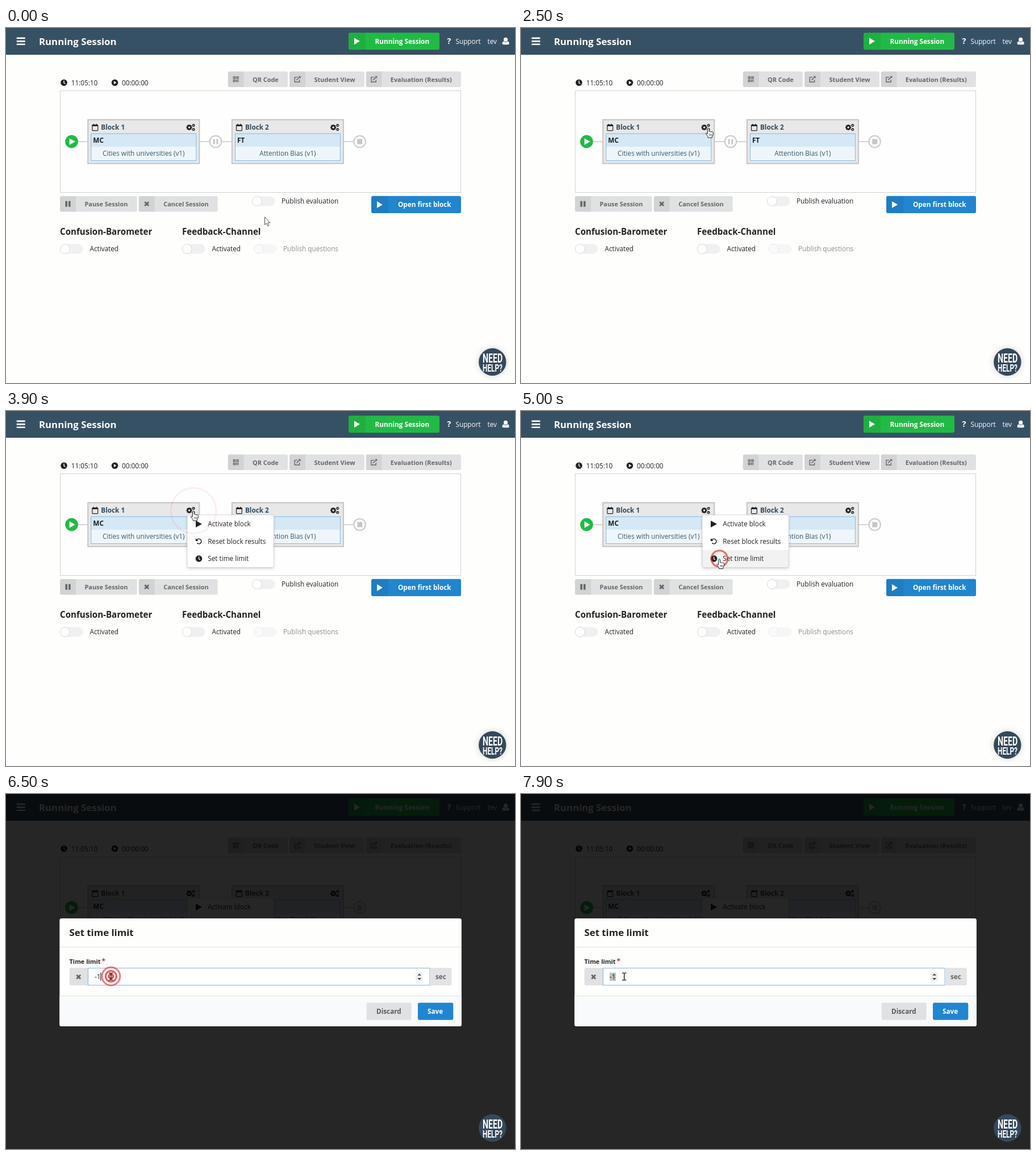
Recreate the animation shown at these times as an HTML page with a canvas. Size 896 by 625 pixels, loop 8000 ms.

```html
<!DOCTYPE html>
<html lang="en">
<head>
<meta charset="utf-8">
<title>Running Session</title>
<style>
html, body { margin: 0; width: 100%; height: 100%; overflow: hidden; background: #fefefd; }
canvas { display: block; width: 896px; height: 625px; }
</style>
</head>
<body>
<canvas id="stage" width="896" height="625"></canvas>
<script>
const ctx = document.getElementById('stage').getContext('2d');
const LOOP = 8000, STEP = 100;
const SANS = '"Open Sans", "Noto Sans", sans-serif';
const INK = '#222', MUTED = '#666', NAVY = '#375164', BLUE = '#2185d0', GREEN = '#21ba45', GREY = '#e0e1e2';
const BODY = 11.76, SMALL = 10.92, TITLE = 16.8, HEADING = 15.12;

// Drawing helpers
function text(s, x, y, color = INK, size = BODY, weight = 400, align = 'left') {
  ctx.font = `${weight} ${size}px ${SANS}`;
  ctx.textAlign = align;
  ctx.fillStyle = color;
  ctx.fillText(s, x, y);
}
const bold = (s, x, y, color, size) => text(s, x, y, color, size, 700);

function rect(x, y, w, h, color) {
  ctx.fillStyle = color;
  ctx.fillRect(x, y, w, h);
}
function frame(x, y, w, h, color, lw = 1) {
  ctx.strokeStyle = color;
  ctx.lineWidth = lw;
  ctx.strokeRect(x + lw / 2, y + lw / 2, w - lw, h - lw);
}
function round(x, y, w, h, r, color) {
  ctx.beginPath();
  ctx.roundRect(x, y, w, h, r);
  ctx.fillStyle = color;
  ctx.fill();
}
function disc(x, y, r, color) {
  ctx.beginPath();
  ctx.arc(x, y, r, 0, Math.PI * 2);
  ctx.fillStyle = color;
  ctx.fill();
}
function circle(x, y, r, color, lw) {
  ctx.beginPath();
  ctx.arc(x, y, r, 0, Math.PI * 2);
  ctx.strokeStyle = color;
  ctx.lineWidth = lw;
  ctx.stroke();
}
function poly(points, color) {
  ctx.beginPath();
  points.forEach(([x, y]) => ctx.lineTo(x, y));
  ctx.closePath();
  ctx.fillStyle = color;
  ctx.fill();
}
function line(points, color, lw) {
  ctx.beginPath();
  points.forEach(([x, y]) => ctx.lineTo(x, y));
  ctx.strokeStyle = color;
  ctx.lineWidth = lw;
  ctx.stroke();
}

// Icons, placed by their centre
function play(x, y, color, w = 10, h = 12) {
  poly([[x - w / 2, y - h / 2], [x + w / 2, y], [x - w / 2, y + h / 2]], color);
}
function pause(x, y, color, w = 3.6, h = 10, gap = 2) {
  rect(x - gap / 2 - w, y - h / 2, w, h, color);
  rect(x + gap / 2, y - h / 2, w, h, color);
}
function cross(x, y, color) {
  line([[x - 3.4, y - 3.4], [x + 3.4, y + 3.4]], color, 2.8);
  line([[x + 3.4, y - 3.4], [x - 3.4, y + 3.4]], color, 2.8);
}
function clock(x, y) {
  disc(x, y, 5.8, INK);
  line([[x, y - 3.6], [x, y + 0.4], [x + 2.4, y + 2]], '#fff', 1.3);
}
function gear(x, y, r, teeth) {
  for (let i = 0; i < teeth; i++) {
    const a = i / teeth * Math.PI * 2;
    line([[x, y], [x + Math.cos(a) * r, y + Math.sin(a) * r]], INK, r * 0.5);
  }
  circle(x, y, r * 0.58, INK, r * 0.42);
  disc(x, y, r * 0.36, '#e8e8e8');
}
function gears(x, y) {
  gear(x - 2.8, y, 5, 8);
  gear(x + 4.8, y - 3.6, 2.7, 6);
  gear(x + 4.8, y + 3.6, 2.7, 6);
}
function calendar(x, y) {
  ctx.beginPath();
  ctx.roundRect(x - 4.9, y - 4.3, 9.8, 10, 1);
  ctx.strokeStyle = INK;
  ctx.lineWidth = 1.2;
  ctx.stroke();
  rect(x - 5, y - 4.5, 10, 2.4, INK);
  rect(x - 3.3, y - 6.2, 1.6, 2.4, INK);
  rect(x + 1.7, y - 6.2, 1.6, 2.4, INK);
}
function qrIcon(x, y) {
  for (const [dx, dy] of [[-5, -5], [0.6, -5], [-5, 0.6]]) frame(x + dx, y + dy, 4.4, 4.4, MUTED, 1.4);
  rect(x + 0.6, y + 0.6, 2, 4.4, MUTED);
  rect(x + 3.4, y + 0.6, 1.6, 2, MUTED);
  rect(x + 3.4, y + 3.6, 1.6, 1.4, MUTED);
}
function external(x, y) {
  line([[x + 0.5, y - 3.6], [x - 4.8, y - 3.6], [x - 4.8, y + 4.8], [x + 3.6, y + 4.8], [x + 3.6, y + 0.8]], MUTED, 1.4);
  line([[x - 1.6, y + 1.6], [x + 4, y - 4]], MUTED, 1.6);
  poly([[x + 1.6, y - 5.4], [x + 5.6, y - 5.4], [x + 5.6, y - 1.4]], MUTED);
}
function undo(x, y) {
  ctx.beginPath();
  ctx.arc(x, y, 4.3, -2.6, 2.4);
  ctx.strokeStyle = INK;
  ctx.lineWidth = 1.6;
  ctx.stroke();
  poly([[x - 5.6, y - 5.4], [x - 5.6, y - 0.6], [x - 0.8, y - 0.6]], INK);
}

// Page parts
function button(x, y, w, h, fill, iconW) {
  round(x, y, w, h, 3, fill);
  if (iconW) round(x, y, iconW, h, [3, 0, 0, 3], 'rgba(0,0,0,0.06)');
}
function smallButton(x, y, w, icon, label, labelX) {
  button(x, y, w, 27.5, GREY, 28);
  icon(x + 14, y + 13.7, MUTED);
  bold(label, labelX, y + 18, MUTED, SMALL);
}
function toggle(x, y, label, labelX, alpha = 1) {
  ctx.globalAlpha = alpha;
  round(x, y - 8.5, 40.5, 17, 8.5, '#f0f0f0');
  disc(x + 8.8, y, 8.6, '#fefefe');
  circle(x + 8.8, y, 8.4, '#d6d6d6', 0.9);
  text(label, labelX, y + 4.2);
  ctx.globalAlpha = 1;
}
function block(x, name, kind, question) {
  rect(x, 160.5, 198, 79, '#e8e8e8');
  frame(x, 160.5, 198, 79, '#c6c6c6', 2);
  calendar(x + 13.5, 175);
  bold(name, x + 24, 179, '#2f4a5e');
  gears(x + 182, 175);
  rect(x + 6, 185.5, 186, 48.5, '#eef6fc');
  rect(x + 6, 185.5, 186, 23.5, '#d5e8f6');
  frame(x + 6, 185.5, 186, 48.5, '#85b9e0');
  bold(kind, x + 10, 202, '#1c1c1c');
  text(question, x + 99, 225.3, '#3d586c', BODY, 400, 'center');
}
function header() {
  rect(0, 0, 896, 47, NAVY);
  rect(0, 46, 896, 1, '#2c4456');
  for (const y of [16.6, 22, 27.4]) round(18.7, y, 15, 2.7, 0.6, '#fff');
  bold('Running Session', 58, 30, '#fff', TITLE);
  button(603, 8.3, 160, 30, GREEN, 30);
  play(618, 23.3, '#fff');
  bold('Running Session', 649.5, 28, '#fff');
  bold('?', 776.5, 28.3, '#fff', 14.5);
  text('Support', 791.5, 28, '#fff');
  text('tev', 847.5, 28, '#fff');
  round(873.5, 23.3, 12.2, 6, [4, 4, 2, 2], '#fff');
  disc(879.6, 20.6, 4.3, NAVY);
  disc(879.6, 20.4, 3.6, '#fff');
}
function timeline() {
  rect(95, 110, 706, 180, '#fefefe');
  frame(95, 110, 706, 180, '#d2d2d2');
  for (const x of [127, 341, 380, 595]) rect(x, 199.2, 17, 1.7, '#cfcfcf');
  disc(115.5, 200, 11.4, GREEN);
  play(116.7, 200, '#fff', 10, 11.5);
  circle(369, 200, 10.2, '#cacaca', 2);
  pause(369, 200, '#c6c6c6', 3, 9, 2.6);
  circle(622.7, 200, 10.2, '#cacaca', 2);
  rect(618.2, 195.5, 9, 9, '#c6c6c6');
  block(143.3, 'Block 1', 'MC', 'Cities with universities (v1)');
  block(396.9, 'Block 2', 'FT', 'Attention Bias (v1)');
}
function page() {
  rect(0, 0, 896, 625, '#fefefd');
  header();
  clock(102, 96.2);
  text('11:05:10', 114.7, 100.6);
  disc(191.5, 96.2, 5.8, INK);
  play(192.2, 96.2, '#fff', 4.6, 5.8);
  text('00:00:00', 204, 100.6);
  smallButton(390.7, 76.5, 105.3, qrIcon, 'QR Code', 434);
  smallButton(499, 76.5, 132, external, 'Student View', 542.6);
  smallButton(633.7, 76.5, 167.3, external, 'Evaluation (Results)', 676.8);
  timeline();
  smallButton(95, 296, 135.7, pause, 'Pause Session', 138.5);
  smallButton(233.7, 296, 139, cross, 'Cancel Session', 277.2);
  toggle(433, 305, 'Publish evaluation', 485);
  button(643, 295.7, 158, 30.2, BLUE, 30);
  play(658, 311, '#fff');
  bold('Open first block', 690, 315.4, '#fff');
  bold('Confusion-Barometer', 95, 364.2, INK, HEADING);
  bold('Feedback-Channel', 310, 364.2, INK, HEADING);
  toggle(95, 389, 'Activated', 147.5);
  toggle(310, 389, 'Activated', 362.5);
  toggle(436, 389, 'Publish questions', 488, 0.5);
}
function menu(hover) {
  ctx.shadowColor = 'rgba(34,36,38,0.2)';
  ctx.shadowBlur = 5;
  ctx.shadowOffsetY = 2;
  round(319, 183, 152.5, 92.5, 3, '#fff');
  ctx.shadowColor = 'transparent';
  ctx.shadowBlur = ctx.shadowOffsetY = 0;
  if (hover >= 0) rect(319, 184 + hover * 30.4, 152.5, 30.4, '#f2f2f2');
  ctx.beginPath();
  ctx.roundRect(319, 183, 152, 92.5, 3);
  ctx.strokeStyle = 'rgba(34,36,38,0.15)';
  ctx.lineWidth = 0.9;
  ctx.stroke();
  play(339.5, 199, INK, 11, 12);
  undo(339.5, 229.5);
  clock(339.5, 260);
  ['Activate block', 'Reset block results', 'Set time limit'].forEach((s, i) => text(s, 355.3, 203.3 + i * 30.4));
}
function modal(caret, selected) {
  round(94.3, 219, 707.6, 190, 3.5, '#fefefd');
  round(94.3, 355, 707.6, 54, [0, 0, 3.5, 3.5], '#f8fafb');
  rect(94.3, 269, 707.6, 1, '#dde2de');
  rect(94.3, 355, 707.6, 1, '#dde2de');
  bold('Set time limit', 111.5, 250.3, INK, TITLE);
  bold('Time limit', 111.5, 299.2, INK, SMALL);
  bold('*', 168.4, 298.8, '#db2828', BODY);
  round(111.7, 306, 33, 31, [3, 0, 0, 3], GREY);
  cross(127.7, 322, MUTED);
  rect(144, 306, 602.5, 31, '#fff');
  frame(144, 306, 602.5, 31, '#85b7d9');
  if (selected) rect(156, 314.5, 11, 14.5, '#c0c0c0');
  text('-1', 156, 326.2);
  if (caret) rect(166.3, 314.5, 1, 14.5, '#111');
  rect(721, 314, 13, 15.5, '#f0f0f0');
  poly([[724.3, 319.6], [727.7, 316.2], [731.1, 319.6]], '#444');
  poly([[724.3, 324], [727.7, 327.4], [731.1, 324]], '#444');
  round(746.5, 306, 38, 31, [0, 3, 3, 0], '#e2e3e4');
  bold('sec', 756, 326, MUTED);
  button(634.7, 367.5, 79, 30.3, GREY);
  bold('Discard', 652, 387.2, '#5a5a5a');
  button(725, 367.5, 62.3, 30.3, BLUE);
  bold('Save', 742, 387.2, '#fff');
}
// Tall, narrow lettering on the help badge
function badge(dimmed) {
  if (!dimmed) {
    ctx.shadowColor = 'rgba(0,0,0,0.18)';
    ctx.shadowBlur = 12;
  }
  disc(856.3, 588, 24.2, '#34495c');
  ctx.shadowColor = 'transparent';
  ctx.shadowBlur = 0;
  ctx.fillStyle = '#fff';
  ctx.textAlign = 'center';
  for (const [word, size, y] of [['NEED', 14.2, 589], ['HELP?', 11.8, 604.8]]) {
    ctx.save();
    ctx.translate(856.5, y);
    ctx.scale(1, 1.6);
    ctx.font = `700 ${size}px Roboto, sans-serif`;
    ctx.fillText(word, 0, 0);
    ctx.restore();
  }
}

// Pointer: [time, x, y], eased between stops
const STOPS = [
  [1000, 455.5, 333], [1900, 335.3, 203], [2500, 330, 175.5], [3900, 330, 175.5],
  [4400, 349.3, 260], [5400, 349.3, 260], [6000, 184.8, 321], [7300, 184.8, 321], [7700, 181.7, 321]
];
const CLICKS = [2700, 4600, 6050, 6250, 6430];

function pointer(t) {
  const i = STOPS.findIndex(s => s[0] > t);
  if (i === 0) return STOPS[0].slice(1);
  if (i < 0) return STOPS[STOPS.length - 1].slice(1);
  const [ta, xa, ya] = STOPS[i - 1], [tb, xb, yb] = STOPS[i];
  const p = (t - ta) / (tb - ta), e = p * p * (3 - 2 * p);
  return [xa + (xb - xa) * e, ya + (yb - ya) * e];
}
function rings(t) {
  for (const start of CLICKS) {
    const age = t - start;
    if (age < 0 || age > 1300) continue;
    const [x, y] = pointer(start);
    circle(x, y, 1.5 + age * 0.032, `rgba(234,38,38,${0.95 * (1 - age / 1300)})`, 3);
  }
}
function outline(lw) {
  ctx.fillStyle = '#fff';
  ctx.fill();
  ctx.strokeStyle = '#222';
  ctx.lineWidth = lw;
  ctx.lineJoin = 'round';
  ctx.stroke();
}
function arrow() {
  ctx.beginPath();
  [[0, 0], [0, 13.4], [3, 10.7], [5.2, 15.8], [7.4, 14.8], [5.3, 9.9], [9.4, 9.6]].forEach(([x, y]) => ctx.lineTo(x, y));
  ctx.closePath();
  outline(0.8);
}
function hand() {
  ctx.beginPath();
  ctx.moveTo(-1.6, 11);
  ctx.lineTo(-1.6, 1.6);
  ctx.quadraticCurveTo(-0.2, -0.9, 1.2, 1.6);
  ctx.lineTo(1.2, 6.4);
  for (const x of [3.6, 6, 8.2]) ctx.quadraticCurveTo(x - 0.8, 5 + x * 0.18, x, 7.2 + x * 0.1);
  ctx.lineTo(8.2, 12.5);
  ctx.lineTo(6.4, 15.4);
  ctx.lineTo(6.4, 17.6);
  ctx.lineTo(-0.8, 17.6);
  ctx.lineTo(-0.8, 15.8);
  ctx.lineTo(-4.9, 10.4);
  ctx.quadraticCurveTo(-4.2, 8, -1.6, 11);
  ctx.closePath();
  outline(1);
  for (const x of [1.6, 3.7, 5.8]) line([[x, 11], [x, 14.2]], '#222', 0.8);
}
function beam() {
  rect(-0.7, -6, 1.4, 13, '#111');
  for (const y of [-6.6, 6]) {
    rect(-3.6, y, 3, 1.3, '#111');
    rect(0.6, y, 3, 1.3, '#111');
  }
}
function cursor(t, x, y) {
  const overLink = t < 5100 ? t > 1900 && y < 182 || t >= 2800 : t <= 5400;
  ctx.save();
  ctx.translate(x, y);
  if (t > 5400 && y > 306) beam();
  else if (overLink) hand();
  else arrow();
  ctx.restore();
}
function caretOn(t) {
  const since = t < 6000 ? t - 5100 : t < 6200 ? t - 6000 : t - 6200;
  return Math.floor(since / 500) % 2 === 0;
}

function draw(t) {
  const [x, y] = pointer(t);
  const dialog = t >= 5100, selected = t >= 6600;
  page();
  if (t >= 2800 && !dialog || t >= 5600) {
    const row = Math.floor((y - 184) / 30.4);
    menu(dialog || row > 2 ? -1 : row);
  }
  if (dialog) {
    rect(0, 0, 896, 625, 'rgba(0,0,0,0.85)');
    modal(!selected && caretOn(t), selected);
  }
  badge(dialog);
  rings(t);
  cursor(t, x, y);
}

const begin = performance.now();
function tick() {
  const t = (performance.now() - begin) % LOOP;
  draw(Math.floor(t / STEP) * STEP);
  requestAnimationFrame(tick);
}
tick();
</script>
</body>
</html>
```
